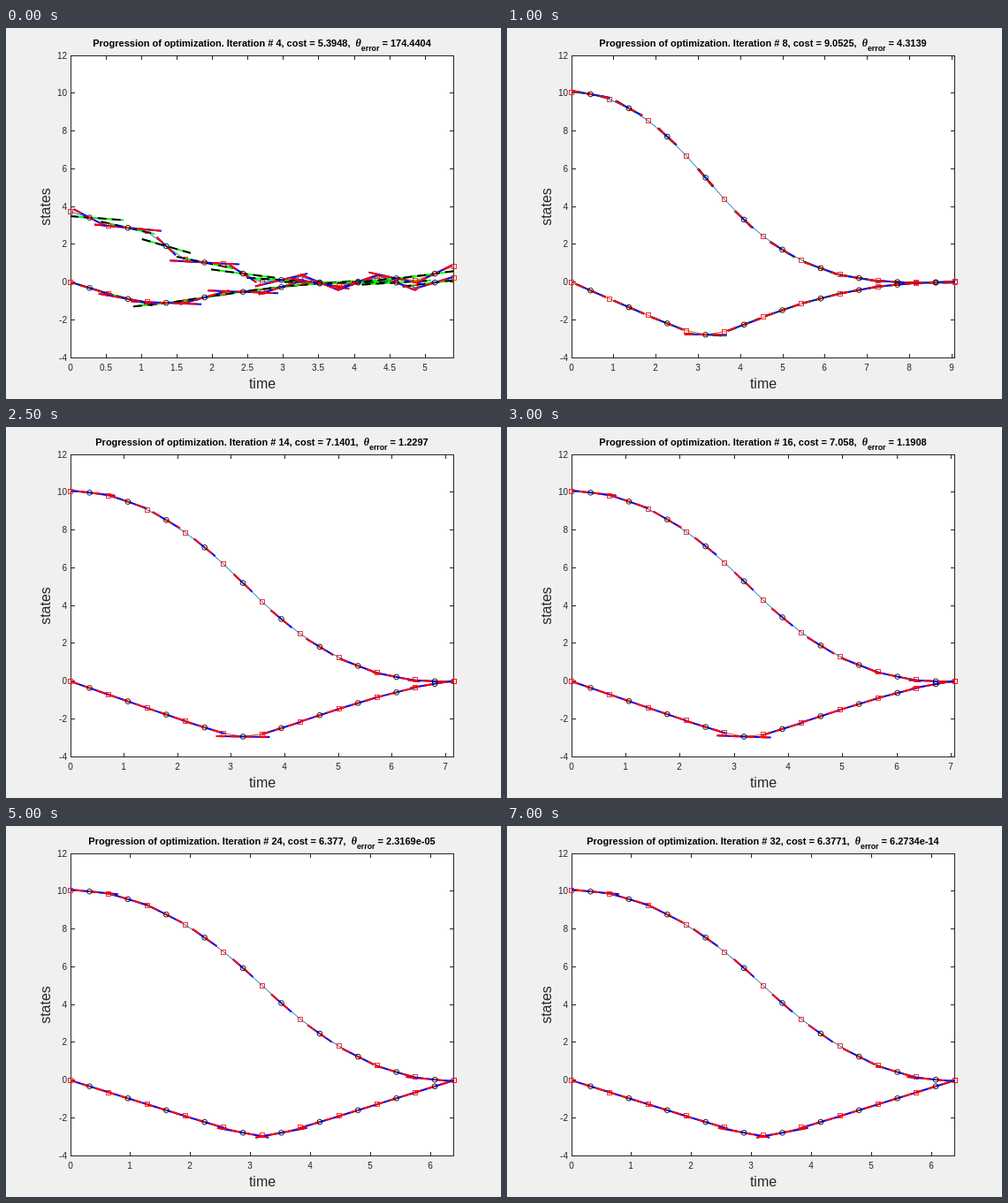
An HTML page that plays this animation: 560 px wide and 420 px high, repeating every 7500 ms.

```html
<!DOCTYPE html>
<html>
<head>
<meta charset="utf-8">
<style>
  html, body { margin: 0; width: 560px; height: 420px; overflow: hidden; background: #f0f0f0; }
  svg { display: block; font-family: "Liberation Sans", Arial, sans-serif; }
  text { white-space: pre; fill: #262626; }
  .title { font: bold 11px "Liberation Sans", Arial, sans-serif; fill: #000; }
  .theta { font: italic bold 12px "Liberation Serif", serif; }
  .tick { font-size: 10px; }
  .label { font-size: 16px; }
</style>
</head>
<body>
<svg id="plot" width="560" height="420" viewBox="0 0 560 420"></svg>
<script>
const LEFT = 72.8, WIDTH = 434, ZERO = 288.2, UNIT = 21.4, SEGMENTS = 10;

// Milestones of the solve; the runs between them ease from one to the next
const KEYS = [
  { iter: 4, cost: 5.3948, error: 174.4404, start: 3.5 },
  { iter: 6, cost: 7.4965, error: 80.7286, start: 6.13 },
  { iter: 10, cost: 9.2748, error: 2.8388, start: 10.05 },
  { iter: 16, cost: 7.058, error: 1.1908, start: 10.05 },
  { iter: 20, cost: 6.4289, error: 0.27143, start: 10.05 },
  { iter: 24, cost: 6.377, error: 2.3169e-5, start: 10.05 },
  { iter: 32, cost: 6.3771, error: 6.2734e-14, start: 10.05 }
];

function runAt(iter) {
  const n = KEYS.findIndex(key => key.iter >= iter), b = KEYS[n];
  if (b.iter === iter) return b;
  const a = KEYS[n - 1], u = 1 - (1 - (iter - a.iter) / (b.iter - a.iter)) ** 3;
  return {
    iter, start: b.start,
    cost: a.cost + (b.cost - a.cost) * u,
    error: a.error * (b.error / a.error) ** u
  };
}

function format(v) {
  if (v >= 1) return String(+v.toFixed(4));
  return v < 1e-4 ? v.toExponential(4).replace(/-(\d)$/, '-0$1') : v.toPrecision(5);
}

// Accelerate, switch, brake: velocity is a rounded triangle, position its integral
function motion({ cost: T, start }) {
  const turn = Math.min(0.325 * start, T / 2), stop = Math.min(T, 1.09 * start);
  const excess = Math.abs(T - 6.377), bend = 1 + 0.43 * excess;
  const round = 0.09 * turn + 0.08 * excess, gain = 1 + 0.02 * (10.05 - start);
  const velocity = t => {
    const left = (stop - t) / (stop - turn);
    const p = gain * t, q = gain * turn * Math.sign(left) * Math.abs(left) ** bend;
    return Math.hypot((p - q) / 2, round) - (p + q) / 2;
  };
  const travel = (t, n = 200) => {
    let sum = 0;
    for (let i = 0; i < n; i++) sum += Math.max(0, -velocity((i + 0.5) * t / n));
    return sum * t / n;
  };
  const total = travel(T);
  return {
    velocity,
    position: t => start * (1 - travel(t) / total),
    force: t => (velocity(t + 0.01) - velocity(t - 0.01)) / 0.02
  };
}

const line = (x1, y1, x2, y2, color, width = 1, extra = '') =>
  `<line x1="${x1}" y1="${y1}" x2="${x2}" y2="${y2}" stroke="${color}" stroke-width="${width}" ${extra}/>`;
const text = (x, y, s, cls, anchor = 'middle', extra = '') =>
  `<text x="${x}" y="${y}" class="${cls}" text-anchor="${anchor}" ${extra}>${s}</text>`;

// value: smooth curve, rate: its dynamics, wobble(k): offset of knot k
function drawCurve({ cost: T, error }, value, rate, wobble, color) {
  const h = T / SEGMENTS, X = t => LEFT + t / T * WIDTH, Y = v => ZERO - v * UNIT;
  const knot = k => value(k * h) + wobble(k);
  // Two-tone tangent of unit length in data coordinates
  const tangent = (t, v, slope, base, dash) => {
    const dt = 0.5 / Math.hypot(1, slope), dv = dt * slope;
    const ends = [X(t - dt), Y(v - dv), X(t + dt), Y(v + dv)];
    return line(...ends, base, 2) + line(...ends, dash, 2, 'stroke-dasharray="10 6"');
  };
  let path = '', flow = '', spline = '', marks = '';
  for (let k = 0; k <= SEGMENTS; k++) {
    const x = X(k * h), y = Y(knot(k));
    path += `${x},${y} `;
    marks += `<rect x="${Math.round(x) - 2.5}" y="${Math.round(y) - 2.5}" width="5" height="5" fill="none" stroke="#f00" stroke-width=".8"/>`;
    if (k === SEGMENTS) break;
    const t = (k + 0.5) * h, v = value(t), slope = rate(t);
    path += `${X(t)},${Y(v)} `;
    marks += `<circle cx="${X(t)}" cy="${Y(v)}" r="2.9" fill="none" stroke="#000" stroke-width=".9"/>`;
    if (error > 4) flow += tangent(t, v, slope, '#0f0', '#000');
    spline += tangent(t, v, 1.5 * (knot(k + 1) - knot(k)) / h - 0.5 * slope, '#00f', '#f00');
  }
  const thin = `<polyline points="${path}" fill="none" stroke="${color}"/>`;
  return `<g clip-path="url(#box)">${thin + flow + spline}</g>${marks}`;
}

function drawAxes(T) {
  let lines = '<rect x="73.5" y="31.5" width="433" height="342" fill="none" stroke="#262626"/>', labels = '';
  for (let t = 0; t <= T; t += T < 6 ? 0.5 : 1) {
    const x = Math.floor(73 + t / T * 433) + 0.5;
    lines += line(x, 373, x, 369, '#262626') + line(x, 32, x, 36, '#262626');
    labels += text(x - 0.5, 387.6, t, 'tick');
  }
  for (let v = -4; v <= 12; v += 2) {
    const y = Math.floor(31 + (12 - v) / 16 * 342) + 0.5;
    lines += line(74, y, 78, y, '#262626') + line(506, y, 502, y, '#262626');
    labels += text(69, y + 3.8, v, 'tick', 'end');
  }
  return `<g shape-rendering="crispEdges">${lines}</g>` + labels +
    text(290, 408, 'time', 'label') +
    text(0, 0, 'states', 'label', 'middle', 'transform="translate(50 202.5) rotate(-90)"');
}

function render(iter) {
  const run = runAt(iter), { position, velocity, force } = motion(run);
  const zigzag = k => run.error / 680 * (-1) ** k;
  const title = `Progression of optimization. Iteration # ${iter}, cost = ${format(run.cost)},  ` +
    '<tspan class="theta">θ</tspan><tspan dy="5" font-size="8.8">error</tspan>' +
    `<tspan dy="-5"> = ${format(run.error)}</tspan>`;
  document.getElementById('plot').innerHTML =
    '<clipPath id="box"><rect x="73" y="31" width="434" height="343"/></clipPath>' +
    '<rect x="73" y="31" width="434" height="343" fill="#fff"/>' +
    drawAxes(run.cost) +
    drawCurve(run, position, velocity, zigzag, '#0072bd') +
    drawCurve(run, velocity, force, k => zigzag(k) * k / SEGMENTS, '#d95319') +
    text(289.5, 21, title, 'title');
}

let shown = 0;
function tick() {
  const iter = 4 + 2 * Math.floor(performance.now() % 7500 / 500);
  if (iter !== shown) render(shown = iter);
  requestAnimationFrame(tick);
}
tick();
</script>
</body>
</html>
```
